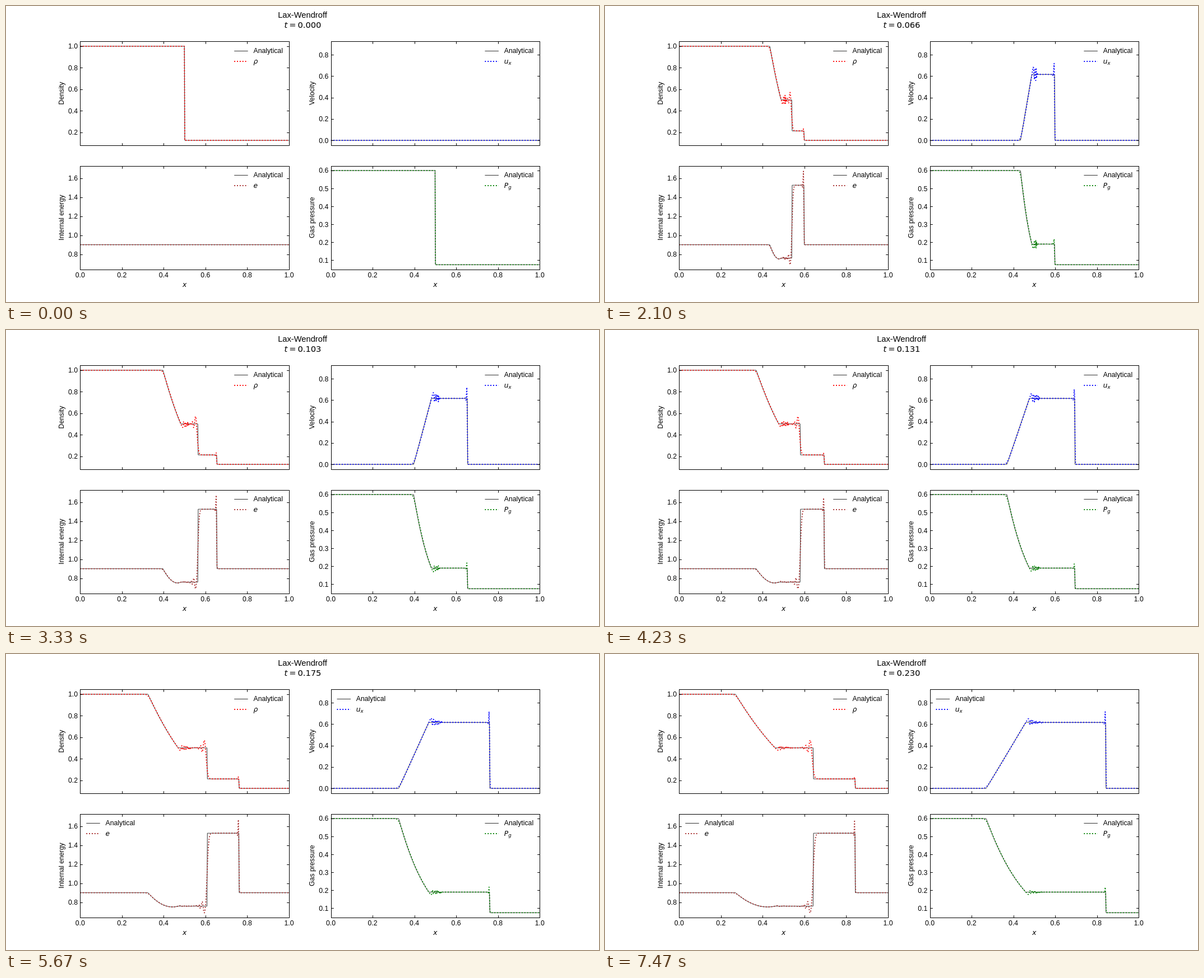
Recreate the animation shown at these times as an HTML page with a canvas. Size 1058 px wide and 529 px high, loop 7.5 s.

```html
<!DOCTYPE html>
<html lang="en">
<head>
<meta charset="utf-8">
<title>Lax-Wendroff shock tube</title>
<style>
  html, body { margin: 0; width: 100%; height: 100%; overflow: hidden; background: #fff; }
  canvas { display: block; }
</style>
</head>
<body>
<canvas id="stage" width="1058" height="529"></canvas>
<script>
const ctx = document.getElementById('stage').getContext('2d');

// ---------- Physics: ideal gas shock tube ----------
const GAMMA = 5 / 3, CELLS = 500, STEPS = 250, STEP_MS = 30, END_TIME = 0.23;
const LEFT = { rho: 1, p: 0.6 }, RIGHT = { rho: 0.125, p: 0.075 };
const dx = 1 / (CELLS - 1);
const grid = Array.from({ length: CELLS }, (_, i) => i * dx);

// Conserved state: [density, momentum, total energy]
const atRest = ({ rho, p }) => [rho, 0, p / (GAMMA - 1)];
const pressure = ([r, m, E]) => (GAMMA - 1) * (E - m * m / r / 2);

function flux(q) {
  const u = q[1] / q[0], p = pressure(q);
  return [q[1], q[1] * u + p, (q[2] + p) * u];
}

function maxWaveSpeed(cells) {
  let fastest = 0;
  for (const q of cells) {
    const c = Math.sqrt(Math.max(GAMMA * pressure(q) / q[0], 0));
    fastest = Math.max(fastest, Math.abs(q[1] / q[0]) + c);
  }
  return fastest;
}

// Two-step (Richtmyer) Lax-Wendroff
function advance(cells, ratio) {
  const f = cells.map(flux), half = [];
  for (let i = 0; i < CELLS - 1; i++) {
    const a = cells[i], b = cells[i + 1], fa = f[i], fb = f[i + 1];
    const mid = k => (a[k] + b[k]) / 2 - ratio / 2 * (fb[k] - fa[k]);
    half.push(flux([mid(0), mid(1), mid(2)]));
  }
  return cells.map((q, i) => {
    if (i === 0 || i === CELLS - 1) return q;
    const inflow = half[i - 1], outflow = half[i];
    const next = k => q[k] - ratio * (outflow[k] - inflow[k]);
    return [next(0), next(1), next(2)];
  });
}

function simulate(courant) {
  let t = 0, cells = grid.map(x => atRest(x < 0.5 ? LEFT : RIGHT));
  const history = [{ t, cells }];
  while (history.length < STEPS) {
    const dt = courant * dx / maxWaveSpeed(cells);
    cells = advance(cells, dt / dx);
    t += dt;
    history.push({ t, cells });
  }
  return history;
}

// Tune the Courant number so that the run ends at END_TIME
let courant = 0.9, history = simulate(courant);
for (let i = 0; i < 4; i++) {
  courant = Math.min(0.98, courant * END_TIME / history[STEPS - 1].t);
  history = simulate(courant);
}

// Exact solution: left fan, contact, right shock (both sound speeds are 1)
const fanSpeed = p => 2 / (GAMMA - 1) * (1 - (p / LEFT.p) ** ((GAMMA - 1) / (2 * GAMMA)));
const shockSpeed = p => (p - RIGHT.p) *
  Math.sqrt(2 / (GAMMA + 1) / RIGHT.rho / (p + (GAMMA - 1) / (GAMMA + 1) * RIGHT.p));
let low = RIGHT.p, high = LEFT.p;
for (let i = 0; i < 50; i++) {
  const p = (low + high) / 2;
  if (fanSpeed(p) > shockSpeed(p)) low = p; else high = p;
}
const pStar = low, uStar = fanSpeed(pStar), jump = pStar / RIGHT.p;
const mu = (GAMMA - 1) / (GAMMA + 1);
const rhoStar = RIGHT.rho * (jump + mu) / (mu * jump + 1);
const front = Math.sqrt((GAMMA + 1) / (2 * GAMMA) * jump + (GAMMA - 1) / (2 * GAMMA));

// Plotted values: density, velocity, specific energy, pressure
const values = (rho, u, p) => [rho, u, p / rho / (GAMMA - 1) + u * u / 2, p];

function exact(x, t) {
  const d = x - 0.5;
  if (d >= front * t) return values(RIGHT.rho, 0, RIGHT.p);
  if (d > uStar * t) return values(rhoStar, uStar, pStar);
  if (d <= -t) return values(LEFT.rho, 0, LEFT.p);
  const u = Math.min(uStar, 2 / (GAMMA + 1) * (1 + d / t));
  const c = 1 - (GAMMA - 1) / 2 * u;
  return values(LEFT.rho * c ** (2 / (GAMMA - 1)), u, LEFT.p * c ** (2 * GAMMA / (GAMMA - 1)));
}

// ---------- Drawing ----------
const SANS = '"Liberation Sans", Arial, sans-serif';
const MATH = '"DejaVu Sans", sans-serif';
const SIZE = 12.24, BIG = 14.7;
const AX_W = 372.7, AX_H = 185.1, MARGIN = 8.41, TICK = 4.3;
const LEGEND_START = 0.7246;

const panels = [
  { col: 0, row: 0, name: 'Density', color: '#f00', symbol: 'ρ',
    min: 0.125, max: 1, ticks: [0.2, 0.4, 0.6, 0.8, 1] },
  { col: 1, row: 0, name: 'Velocity', color: '#00f', symbol: 'u', sub: 'x', moves: true,
    min: 0, max: 0.88, ticks: [0, 0.2, 0.4, 0.6, 0.8] },
  { col: 0, row: 1, name: 'Internal energy', color: '#a52a2a', symbol: 'e', moves: true,
    min: 0.689, max: 1.6825, ticks: [0.8, 1, 1.2, 1.4, 1.6] },
  { col: 1, row: 1, name: 'Gas pressure', color: '#008000', symbol: 'P', sub: 'g',
    min: 0.075, max: 0.6, ticks: [0.1, 0.2, 0.3, 0.4, 0.5, 0.6] },
];
for (const panel of panels) {
  panel.x = 132.25 + panel.col * 447.25;
  panel.y = 63.48 + panel.row * 222.17;
  panel.toX = v => panel.x + v * AX_W;
  panel.toY = v => panel.y + AX_H - MARGIN -
    (v - panel.min) / (panel.max - panel.min) * (AX_H - 2 * MARGIN);
}

const snap = v => Math.floor(v + 0.5) + 0.5;

function text(str, x, y, { size = SIZE, family = SANS, style = '', align = 'left' } = {}) {
  ctx.fillStyle = '#000';
  ctx.font = `${style} ${size}px ${family}`;
  ctx.textAlign = align;
  ctx.fillText(str, x, y);
}
const math = (str, x, y, options) => text(str, x, y, { family: MATH, style: 'italic', ...options });

function stroke(points, color, width, dash = []) {
  ctx.beginPath();
  for (const [x, y] of points) ctx.lineTo(x, y);
  ctx.strokeStyle = color;
  ctx.lineWidth = width;
  ctx.setLineDash(dash);
  ctx.stroke();
}
const solid = points => stroke(points, '#000', 0.8);
const dotted = (points, color) => stroke(points, color, 1.84, [1.84, 3.03]);

function drawAxes({ x, y, row, name, ticks, toX, toY }) {
  const x0 = snap(x), x1 = snap(x + AX_W), y0 = snap(y), y1 = snap(y + AX_H);
  stroke([[x0, y0], [x1, y0], [x1, y1], [x0, y1], [x0, y0], [x1, y0]], '#000', 1);
  for (let i = 0; i <= 5; i++) {
    const tx = snap(toX(i / 5));
    stroke([[tx, y1], [tx, y1 - TICK]], '#000', 1);
    stroke([[tx, y0], [tx, y0 + TICK]], '#000', 1);
    if (row) text((i / 5).toFixed(1), toX(i / 5), 484.8, { align: 'center' });
  }
  for (const v of ticks) {
    const ty = snap(toY(v));
    stroke([[x0, ty], [x0 + TICK, ty]], '#000', 1);
    stroke([[x1, ty], [x1 - TICK, ty]], '#000', 1);
    text(v.toFixed(1), x - 4.3, toY(v) + 4.4, { align: 'right' });
  }
  if (row) math('x', x + AX_W / 2, 501.5, { align: 'center' });
  ctx.save();
  ctx.translate(x - 29.2, y + AX_H / 2);
  ctx.rotate(-Math.PI / 2);
  text(name, 0, 0, { align: 'center' });
  ctx.restore();
}

function drawLegend({ x, y, color, symbol, sub, moves }, t) {
  const onLeft = moves && 0.5 + front * t > LEGEND_START;
  const lx = x + (onLeft ? 11 : 274.95), tx = lx + 34.3;
  const lineY = snap(y + 16.6), dotY = Math.round(y + 35.5);
  solid([[lx, lineY], [lx + 24.5, lineY]]);
  text('Analytical', tx, y + 20.3);
  dotted([[lx, dotY], [lx + 24.5, dotY]], color);
  math(symbol, tx, y + 39.5);
  if (sub) math(sub, tx + ctx.measureText(symbol).width, y + 41.5, { size: SIZE * 0.7 });
}

function drawPanel(panel, index, computed, analytical, t) {
  const path = series => series.map((v, i) => [panel.toX(grid[i]), panel.toY(v[index])]);
  ctx.save();
  ctx.beginPath();
  ctx.rect(panel.x, panel.y, AX_W, AX_H);
  ctx.clip();
  solid(path(analytical));
  dotted(path(computed), panel.color);
  ctx.restore();
  drawAxes(panel);
  drawLegend(panel, t);
}

function draw(step) {
  const { t, cells } = history[step];
  const computed = cells.map(q => values(q[0], q[1] / q[0], pressure(q)));
  const analytical = grid.map(x => exact(x, t));
  ctx.fillStyle = '#fff';
  ctx.fillRect(0, 0, 1058, 529);
  ctx.lineJoin = 'round';
  text('Lax-Wendroff', 529, 21, { size: BIG, align: 'center' });
  math('t', 496.4, 38.5, { size: BIG });
  math('=', 505.2, 38.5, { size: BIG, style: '' });
  math(t.toFixed(3), 520.4, 38.5, { size: BIG, style: '' });
  panels.forEach((panel, i) => drawPanel(panel, i, computed, analytical, t));
}

const start = performance.now();
function tick() {
  draw(Math.floor((performance.now() - start) / STEP_MS) % STEPS);
  requestAnimationFrame(tick);
}
tick();
</script>
</body>
</html>
```
